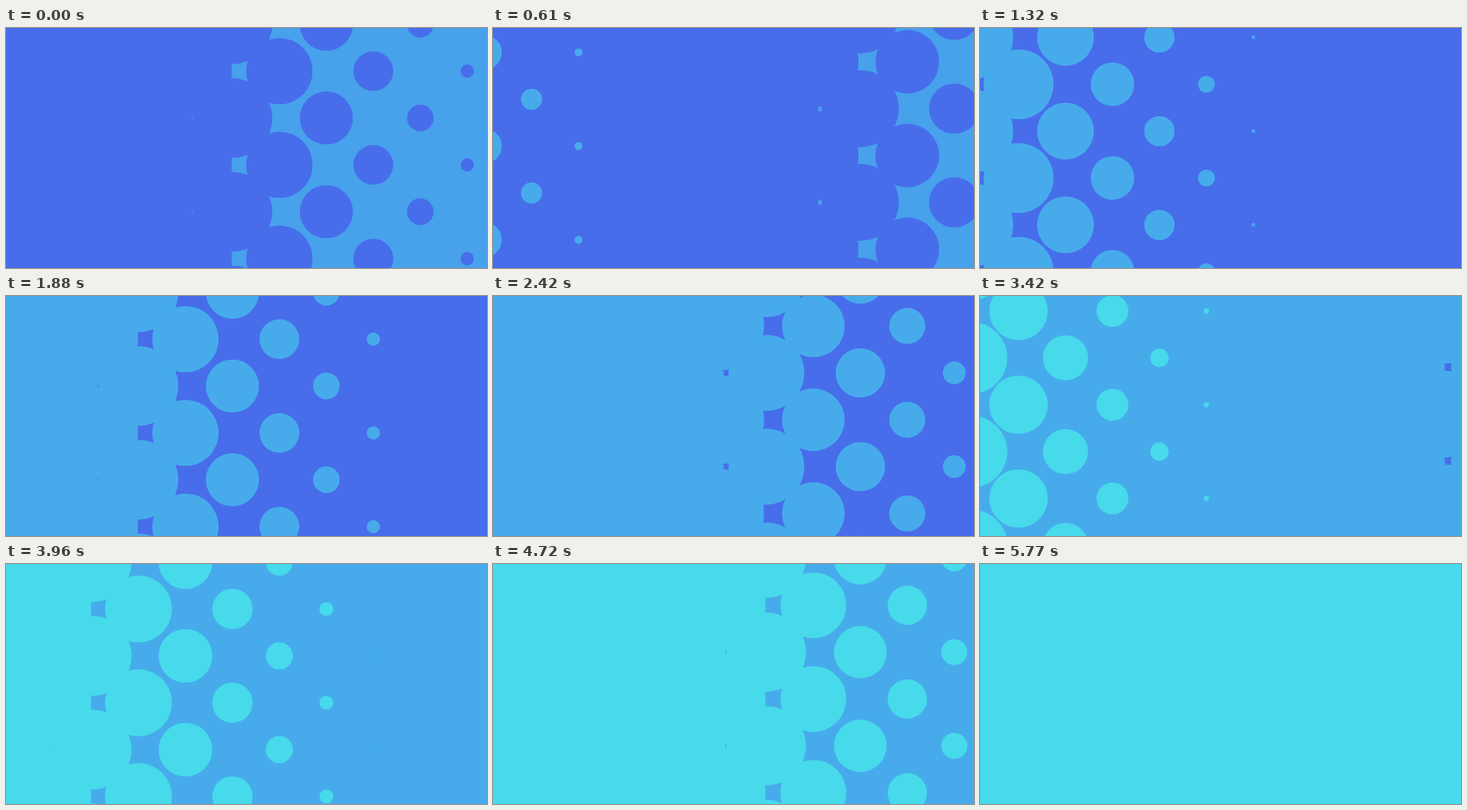
Animation of 512x256 px, one loop 6.85 s. Source, as an HTML page:

```html
<!DOCTYPE html>
<html lang="en">
<head>
<meta charset="utf-8">
<title>Halftone wipe</title>
<style>
  html, body { margin: 0; width: 100%; height: 100%; overflow: hidden; background: hsl(207, 80%, 60%); }
  svg { display: block; width: 100vw; height: 100vh; }
</style>
</head>
<body>
<svg viewBox="0 0 512 256">
  <rect width="512" height="256" fill="hsl(207, 80%, 60%)"/>
  <path fill="hsl(226, 80%, 60%)"/>
  <path fill="hsl(203.5, 80%, 60%)"/>
  <path fill="hsl(186, 80%, 60%)"/>
</svg>
<script>
const LOOP = 6850;
const CELL = 50;
const LAYER_GAP = 560;
const START = 541;
const GROWTH = Math.SQRT2 / 10;
const layers = [...document.querySelectorAll('path')];

// [time, distance travelled by the wave]
const travel = [[0, 0], [1320, 324], [2420, 596], [3420, 840], [3960, 972], [4720, 1168], [5770, 1428]];

// [time, number of equal steps since the previous entry]
const beats = [
  [0, 0], [30, 1], [670, 13], [730, 1], [1320, 10], [1440, 2], [2080, 12], [2140, 1],
  [2420, 5], [2480, 1], [2770, 6], [2830, 1], [3420, 9], [3540, 2], [3960, 7], [4010, 1],
  [4190, 3], [4250, 1], [4720, 10], [4800, 1], [4920, 3], [4950, 1], [5590, 14], [5650, 1], [5770, 4]
];

// The span of a list that holds time t, or null past its end
function span(list, t) {
  const i = list.findIndex(([time]) => time > t);
  return i < 0 ? null : [list[i - 1], list[i]];
}

function hold(t) {
  const s = span(beats, t);
  if (!s) return beats[beats.length - 1][0];
  const [[a], [b, n]] = s;
  return a + Math.floor((t - a) / (b - a) * n) * (b - a) / n;
}

function distance(t) {
  const s = span(travel, t);
  if (!s) return travel[travel.length - 1][1];
  const [[a, from], [b, to]] = s;
  return Math.round((from + (to - from) * (t - a) / (b - a)) / 4) * 4;
}

function circle(x, y, r) {
  const d = 2 * r;
  return `M${x - r} ${y}a${r} ${r} 0 1 1 ${d} 0a${r} ${r} 0 1 1 ${-d} 0z`;
}

// Dots shrink to the right up to the front and drift down as it advances
function dots(front) {
  const drift = (((front - 245) % 100) + 100) % 100;
  let d = '';
  for (let col = -2; col < 12; col++) {
    const x = 41 + col * CELL;
    const r = (front - x) * GROWTH;
    if (r <= 0) break;
    const top = drift - 100 - (col % 2 ? CELL : 0);
    for (let y = top; y < 256 + r && y < 400; y += 2 * CELL) d += circle(x, y, r);
  }
  return d;
}

function draw(t) {
  const front = START + distance(hold(t));
  layers.forEach((path, i) => path.setAttribute('d', dots(front - i * LAYER_GAP)));
}

const begin = performance.now();
function tick() {
  draw((performance.now() - begin) % LOOP);
  requestAnimationFrame(tick);
}
draw(0);
requestAnimationFrame(tick);
</script>
</body>
</html>
```
